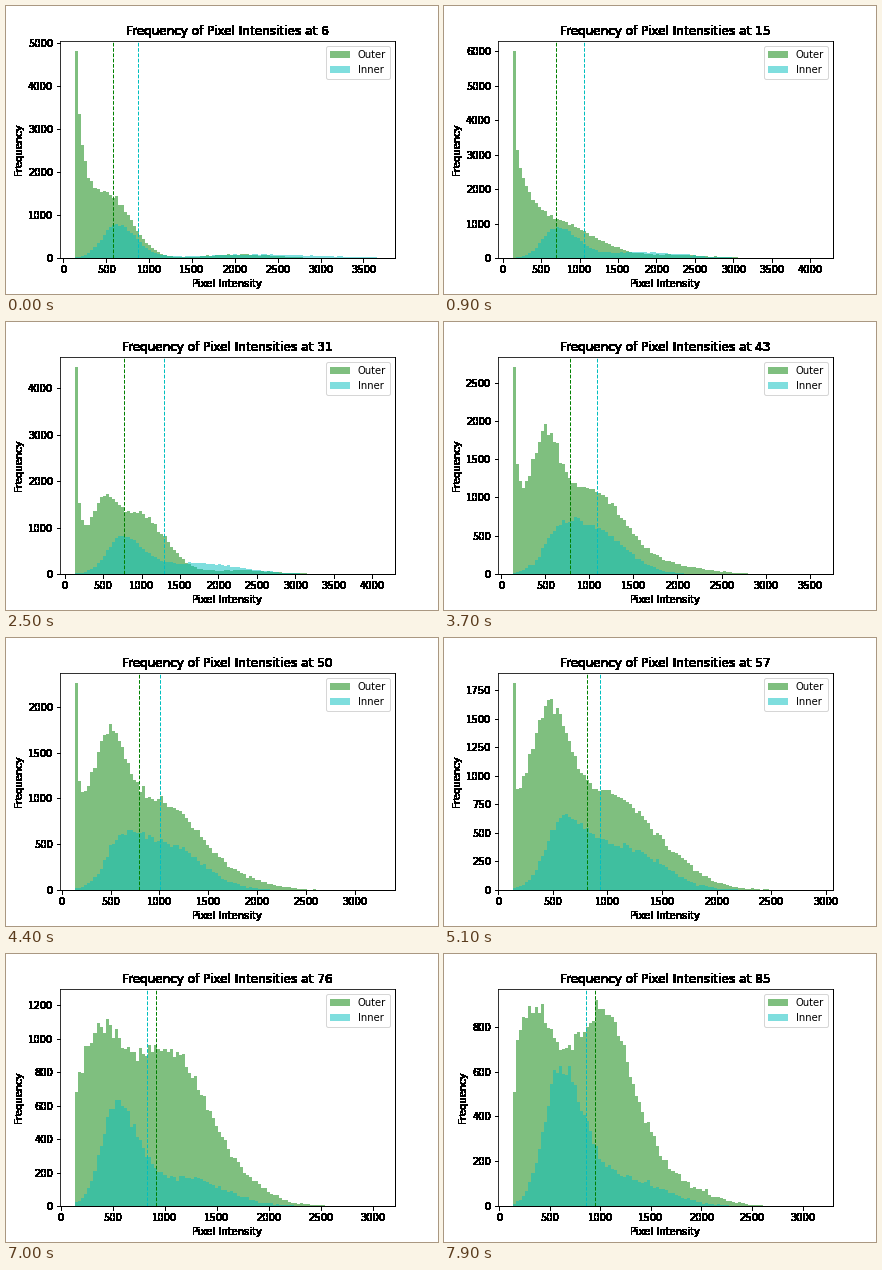
A matplotlib script for the animation above (8 s loop, 432 by 288 pixels).

```python
import numpy as np
import matplotlib.pyplot as plt
from matplotlib.animation import FuncAnimation

FRAMES, INTERVAL = 80, 100
BINS, LOW, FIRST = 100, 138, 6
KEYS = [0, 9, 25, 37, 51, 62, 79]


def keyed(i, *values):
    """Move linearly through one value per key moment."""
    return np.interp(i, KEYS, values)


def bell(x, height, centre, left, right=None):
    """Gaussian bump, optionally with a different width on its right."""
    width = np.where(x < centre, left, right or left)
    return height * np.exp(-0.5 * ((x - centre) / width) ** 2)


def outer_shape(x, i, high):
    u = i / (FRAMES - 1)
    decay = 60 + 140 * np.exp(-((i - 9) / 9) ** 2)
    dark = keyed(i, 4470, 3275, 3100, 2290, 600, 355, 0)
    hump = keyed(i, 0, 0, 1250, 1380, 1290, 820, 800)
    body = keyed(i, 1350, 950, 1300, 1100, 840, 1020, 860)
    spread = keyed(i, 260, 520, 330, 400, 400, 440, 330)
    return (dark * np.exp(-(x - LOW) / decay)
            + bell(x, hump, 500 - 210 * u ** 3, 140 + 80 * u)
            + bell(x, body, 1000 - 450 * np.exp(-(i / 15) ** 2), spread)
            + bell(x, 80, 0.56 * high, 0.1 * high))


def inner_shape(x, i):
    hump = keyed(i, 780, 880, 780, 430, 530, 600, 600)
    centre = keyed(i, 610, 700, 740, 650, 580, 470, 600)
    tail = keyed(i, 80, 170, 230, 520, 370, 220, 120)
    far = keyed(i, 2300, 1800, 1750, 1100, 1150, 1150, 1250)
    return (bell(x, hump, centre, 0.26 * centre, 0.38 * centre)
            + bell(x, tail, far, 0.3 * far))


def sample(n, edges, rng):
    """Add whole-number binning and counting noise."""
    n = n * np.diff(np.ceil(edges)) / (edges[1] - edges[0])
    return np.maximum(n + 0.7 * np.sqrt(n) * rng.standard_normal(BINS), 0)


def harden(img, dpi):
    """Turn every touched pixel solid black."""
    out = np.zeros_like(img)
    out[..., 3] = img[..., 3] > 0
    return out, 0, 0


plt.rcParams.update({"font.family": "DejaVu Sans", "font.size": 10,
                     "figure.subplot.bottom": 0.125})
fig, ax = plt.subplots(figsize=(6, 4), dpi=72, facecolor="white")


def histogram(color, label):
    start = np.linspace(LOW, 4095, BINS + 1)
    return ax.stairs(np.ones(BINS), start, fill=True, color=color, alpha=0.5, label=label)


def marker(color):
    return ax.axvline(0, color=color, linestyle="dashed", linewidth=1)


outer, inner = histogram("g", "Outer"), histogram("c", "Inner")
outer_mean, inner_mean = marker("g"), marker("c")
ax.set_xlabel("Pixel Intensity")
ax.set_ylabel("Frequency")
ax.legend(handles=[outer, inner], loc="upper right")
for part in (ax.title, ax.xaxis, ax.yaxis, ax.spines["right"], ax.spines["bottom"]):
    part.set_agg_filter(harden)


def update(i):
    rng = np.random.default_rng(100 + i)
    high = keyed(i, 3689, 4095, 4095, 3588, 2923, 2993, 3149)
    peak = keyed(i, 4810, 6010, 4460, 2705, 1815, 1515, 925)
    edges = np.linspace(LOW, high, BINS + 1)
    mid = (edges[:-1] + edges[1:]) / 2

    n = np.minimum(sample(outer_shape(mid, i, high), edges, rng), peak)
    n[0] = peak * np.interp(i, [51, 62], [1, 0.55])
    outer.set_data(n, edges)
    inner.set_data(sample(inner_shape(mid, i), edges, rng), edges)

    outer_mean.set_xdata([keyed(i, 576, 692, 770, 780, 811, 894, 944)] * 2)
    inner_mean.set_xdata([keyed(i, 867, 1057, 1291, 1086, 930, 800, 855)] * 2)

    pad = 0.05 * (high - LOW)
    ax.set_xlim(LOW - pad, high + pad)
    ax.set_ylim(0, 1.05 * peak)
    ax.set_title(f"Frequency of Pixel Intensities at {FIRST + i}")
    return []


anim = FuncAnimation(fig, update, frames=FRAMES, interval=INTERVAL,
                     init_func=lambda: update(0), repeat=True, repeat_delay=0)
plt.show()
```
